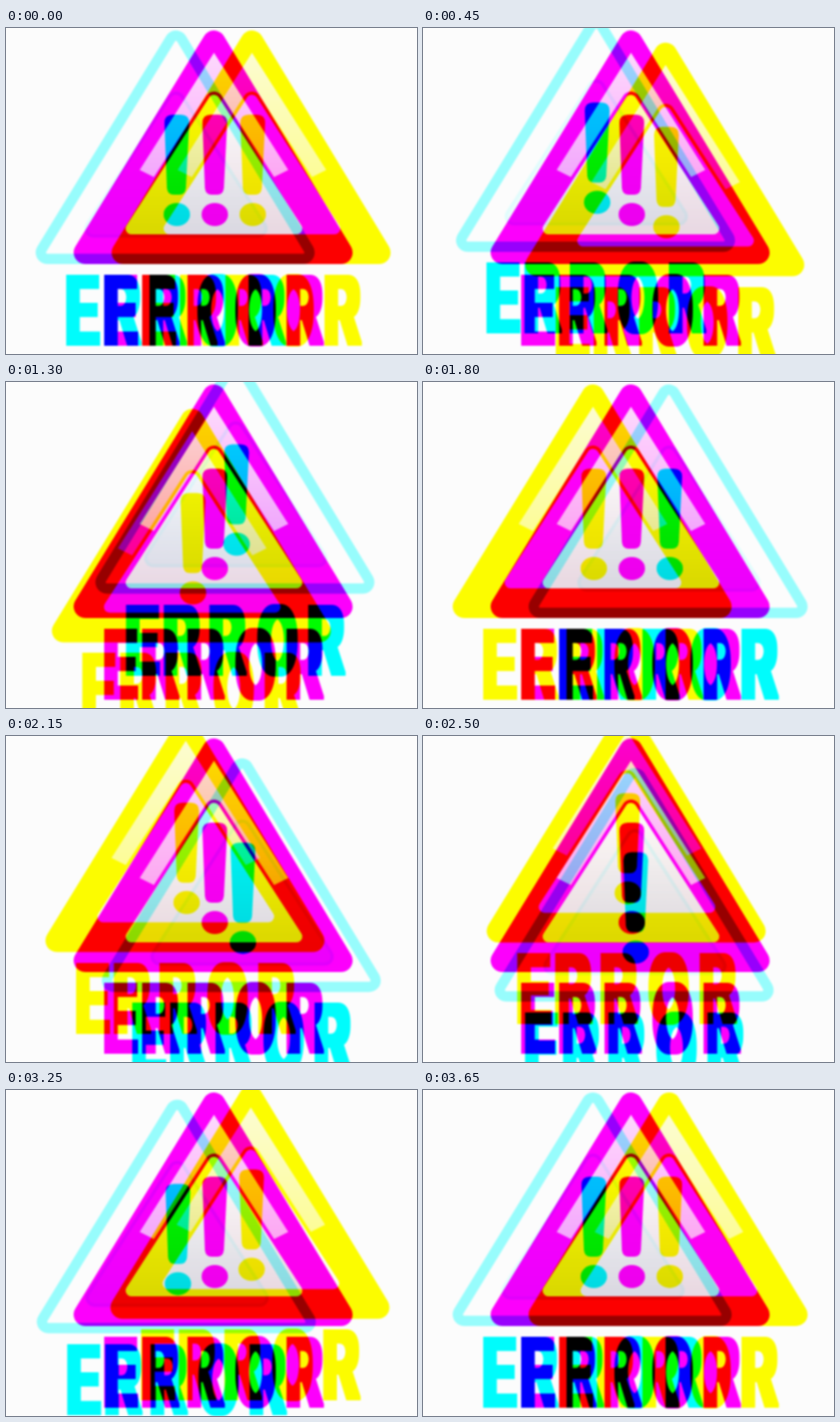
These frames come from a looping animation (498x395 px, 3700 ms). An HTML page:

```html
<!DOCTYPE html>
<html lang="en">
<head>
<meta charset="utf-8">
<title>Error</title>
<style>
  html, body { margin: 0; width: 100%; height: 100%; overflow: hidden; background: #fcfcfc; }
  svg { display: block; width: 498px; height: 395px; isolation: isolate; }
  .ink { mix-blend-mode: multiply; filter: blur(1px); }
  text { font: bold 118px "Liberation Sans", Arial, sans-serif; font-kerning: none; }
</style>
</head>
<body>
<svg id="stage" viewBox="0 0 498 395">
  <defs>
    <filter id="heavy"><feMorphology operator="dilate" radius="4 2"/></filter>
  </defs>
  <rect width="498" height="395" fill="#fcfcfc"/>
</svg>
<script>
const LOOP = 3700, STEP = 50;
const RX = 46, RY = 36;
// time in ms, angle in degrees along the orbit
const ORBIT = [[0, 0], [900, 70], [1300, 125], [1800, 180], [2500, 264], [3250, 346], [LOOP, 360]];

const OUTER = "M252 17L96 272H406Z";
const INNER = "M252 88L152 243H352Z";
const GLOSS = "M252 30L162 172L186 184L252 88L318 184L342 172Z";

const inks = [
  { id: "cyan", color: "#0ff", rim: "#9ff", line: "#e4ffff", tint: "#f0ffff", dir: 1 },
  { id: "magenta", color: "#f0f", rim: "#f0f", line: "#f0f", tint: "#ecdcf4", gloss: ["#ffdcff", "#ffa8ff"], dir: 0 },
  { id: "yellow", color: "#ff0", rim: "#ff0", line: "#ff0", tint: "#fffff0", gloss: ["#ffffd4", "#ffff98"], dir: -1 }
];

function fade(id, top, bottom) {
  return `<linearGradient id="${id}" x2="0" y2="1">
    <stop stop-color="${top}"/><stop offset="1" stop-color="${bottom}"/>
  </linearGradient>`;
}

function rounded(path, paint, width) {
  return `<path d="${path}" fill="${paint}" stroke="${paint}" stroke-width="${width}" stroke-linejoin="round"/>`;
}

function sign(k) {
  const face = k.gloss
    ? fade(k.id + "-gloss", ...k.gloss) + `<path d="${GLOSS}" fill="url(#${k.id}-gloss)"/>`
    : rounded(OUTER, "#fff", 3);
  return `<g class="ink" id="${k.id}">
    ${fade(k.id + "-pane", "#fff", k.tint)}
    ${rounded(OUTER, k.rim, 28)}
    ${face}
    ${rounded(INNER, k.line, 22)}
    ${rounded(INNER, `url(#${k.id}-pane)`, 14)}
    <g fill="${k.color}">
      <path d="M238 115Q238 105 248 105H258Q268 105 268 115L264 194Q263 202 256 202H249Q242 202 241 194Z"/>
      <ellipse cx="253" cy="226" rx="16" ry="14"/>
      <g filter="url(#heavy)"><text transform="translate(119 383) scale(.5 1)" x="0 92 202 321 442">ERROR</text></g>
    </g>
  </g>`;
}

const stage = document.getElementById("stage");
stage.insertAdjacentHTML("beforeend", inks.map(sign).join(""));
const moving = inks.filter(k => k.dir).map(k => ({ dir: k.dir, el: document.getElementById(k.id) }));

function slope(i) {
  if (i === 0 || i === ORBIT.length - 1) return 0;
  const [t0, a0] = ORBIT[i - 1], [t1, a1] = ORBIT[i + 1];
  return (a1 - a0) / (t1 - t0);
}

// Cubic Hermite through the orbit table, at rest where the loop closes
function angleAt(t) {
  let i = 0;
  while (t >= ORBIT[i + 1][0]) i++;
  const [t0, a0] = ORBIT[i], [t1, a1] = ORBIT[i + 1];
  const d = t1 - t0, u = (t - t0) / d, v = 1 - u;
  return a0 * v * v * (1 + 2 * u) + a1 * u * u * (3 - 2 * u)
    + d * u * v * (slope(i) * v - slope(i + 1) * u);
}

function draw(now) {
  const t = Math.floor((now % LOOP) / STEP) * STEP;
  const a = angleAt(t) * Math.PI / 180;
  const x = -RX * Math.cos(a), y = -RY * Math.sin(a);
  for (const { dir, el } of moving)
    el.setAttribute("transform", `translate(${(x * dir).toFixed(2)} ${(y * dir).toFixed(2)})`);
}

const start = performance.now();
function tick() {
  draw(performance.now() - start);
  requestAnimationFrame(tick);
}
tick();
</script>
</body>
</html>
```
